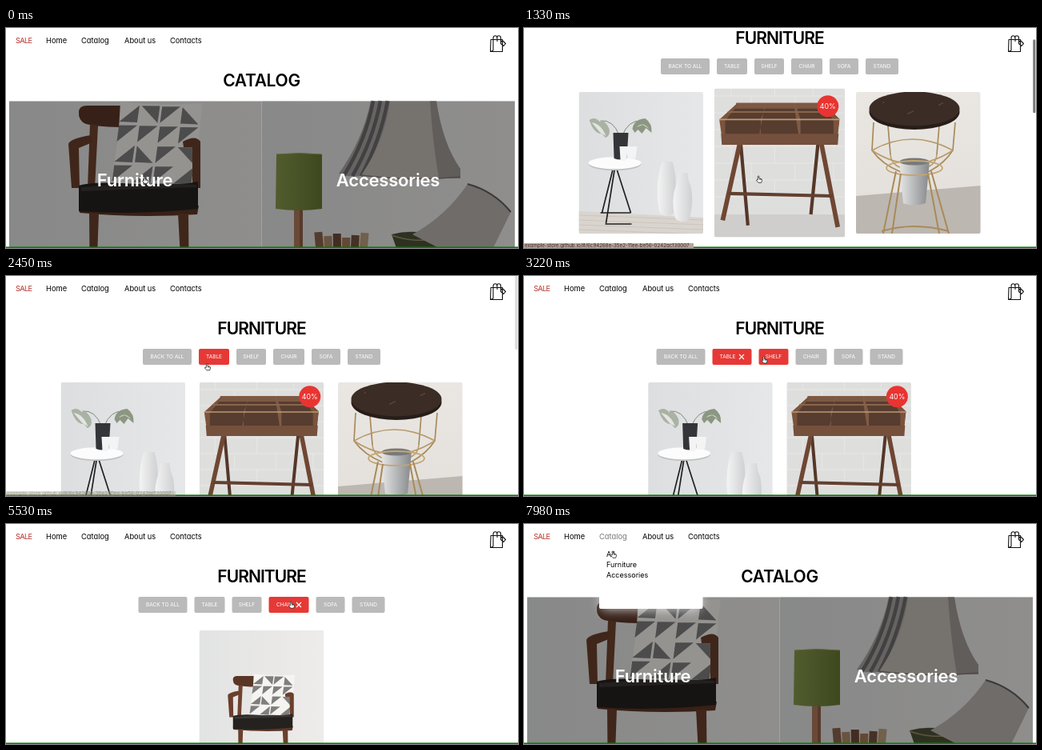
An HTML page for the animation above (8 s loop, 640 px wide and 275 px high).

```html
<!DOCTYPE html>
<html lang="en">
<head>
<meta charset="utf-8">
<title>Shop catalog</title>
<style>
  html, body { margin: 0; width: 100%; height: 100%; overflow: hidden; background: #fff; }
  svg { display: block; width: 640px; height: 275px; font-family: Inter, "Open Sans", sans-serif; font-feature-settings: "cv11"; }
  .title { font-size: 21px; font-weight: 600; text-anchor: middle; }
  .cover { font-size: 22px; font-weight: 600; letter-spacing: -.2px; text-anchor: middle; fill: #fff; }
  .nav { font-size: 9.3px; }
  .menu { font-size: 9px; }
  .button { font-size: 6.5px; fill: #fff; }
  .badge { font-size: 8.8px; fill: #fff; text-anchor: middle; }
  .status { font-size: 6.2px; fill: #3d2a20; }
</style>
</head>
<body>
<svg viewBox="0 0 640 275">
  <defs id="defs"></defs>
  <g id="stage"></g>
</svg>
<script>
const LOOP = 8000;
const CARD_W = 155.5, CARD_H = 177, CARD_PITCH = 173.25, CENTER = 319.5;

const shape = (fill, d) => `<path fill="${fill}" d="${d}"/>`;
const line = (color, width, d) => `<path fill="none" stroke="${color}" stroke-width="${width}" d="${d}"/>`;
const rect = (fill, x, y, w, h, extra = '') => `<rect x="${x}" y="${y}" width="${w}" height="${h}" fill="${fill}" ${extra}/>`;
const oval = (fill, x, y, rx, ry) => `<ellipse cx="${x}" cy="${y}" rx="${rx}" ry="${ry}" fill="${fill}"/>`;
const text = (cls, x, y, words, extra = '') => `<text class="${cls}" x="${x}" y="${y}" ${extra}>${words}</text>`;
const group = (attrs, content) => `<g ${attrs}>${content}</g>`;
const use = (id, transform = '') => `<use href="#${id}" transform="${transform}"/>`;
const gradient = (id, from, to, vertical) =>
  `<linearGradient id="${id}" ${vertical ? 'x2="0" y2="1"' : ''}><stop stop-color="${from}"/><stop offset="1" stop-color="${to}"/></linearGradient>`;

// Eased interpolation through [time, value] pairs.
function track(t, keys) {
  if (t <= keys[0][0]) return keys[0][1];
  for (let i = 1; i < keys.length; i++) {
    const [t1, v1] = keys[i], [t0, v0] = keys[i - 1];
    if (t < t1) {
      const k = (t - t0) / (t1 - t0);
      return v0 + (v1 - v0) * k * k * (3 - 2 * k);
    }
  }
  return keys.at(-1)[1];
}

function pillow() {
  const at = (u, v) => `${143 + u * 25.5 - v * 3} ${94 + u * .8 + v * 25}`;
  let out = shape('#f6f4f0', 'M143 92Q195 98 246 94Q239 145 238 196Q185 198 131 193Q141 145 143 92Z');
  for (let v = 0; v < 4; v++) for (let u = 0; u < 4; u++) {
    const corners = [at(u + .06, v + .1), at(u + .95, v + .08), at(u + .93, v + .93), at(u + .05, v + .92)];
    corners.splice((u * 3 + v * 2 + u * v) % 4, 1);
    out += shape('url(#hatch)', `M${corners.join('L')}Z`);
  }
  return out;
}

const chair = () =>
  rect('url(#wall)', 0, -20, 325, 365) +
  shape('#5a3626', 'M91 104Q92 97 101 97L150 97L150 124Q118 124 100 120Q90 116 91 104Z') +
  shape('#70432f', 'M105 120L115 122L111 200L102 200Z') +
  pillow() +
  shape('#6b3f2c', 'M78 145Q80 138 106 134L108 143L91 150L92 200L82 200Z') +
  shape('#6b3f2c', 'M221 142Q237 133 243 142L243 200L233 200L233 149L222 149Z') +
  shape('#5d3625', 'M91 222L241 222L239 233Q165 238 92 231Z') +
  shape('#24211f', 'M91 197Q108 191 165 195Q220 197 240 192L240 226Q165 234 91 229Z') +
  shape('#3a3634', 'M94 199Q165 192 238 196L238 199Q165 201 94 204Z') +
  shape('#6b3f2c', 'M104 231L116 232L112 340L105 340ZM215 232L228 232L229 340L221 340Z') +
  line('#5d3625', 5, 'M112 300L222 300');

function lamps() {
  let out = rect('url(#wall)', 320, 91, 316, 184) +
    shape('#aaa5a4', 'M456 91L482 91Q476 140 448 184Q432 188 416 182Q446 140 456 91Z');
  for (let i = 0; i < 3; i++) out += line('#706b6d', 4.5, `M${459 + i * 9} 91Q${450 + i * 9} 140 ${422 + i * 11} 185`);
  out += shape('#c4bdb7', 'M480 91L532 91Q540 145 568 184Q505 192 444 184Q474 140 480 91Z') +
    shape('#a19a96', 'M530 91L538 91Q546 145 568 176L568 188L541 188Q533 140 530 91Z') +
    line('#857d78', 1.5, 'M444 184Q505 192 568 186') +
    rect('#ae7a5b', 360, 225, 11, 50) + rect('#8f5f46', 367, 225, 4, 50) +
    shape('url(#green)', 'M338 158Q366 155 395 158L395 226Q366 230 337 226Z') +
    line('#9ba15d', 1, 'M338 158Q366 155 395 158');
  ['#8a644c', '#b08a69', '#6e4a39', '#a67857', '#75513f', '#bca07c'].forEach((fill, i) =>
    out += rect(fill, 387 + i * 11, 255 + (i * 5) % 8, 10, 22, `transform="rotate(${-5 + i * 2} ${392 + i * 11} 274)"`));
  return out +
    shape('#4d5137', 'M482 258Q512 250 546 262L538 275L488 275Z') +
    line('#989269', 1.5, 'M482 259Q512 270 546 262') +
    shape('#bbb4b1', 'M577 195Q610 204 631 230L609 275L541 275L508 258Q550 235 577 195Z') +
    line('#625d60', 2, 'M577 195Q610 204 631 230');
}

function sideTable() {
  let out = rect('url(#cool)', 0, 0, 156, 177) + shape('#d9d4ce', 'M0 149L156 157V177H0Z');
  for (let i = 0; i < 4; i++) out += line('#c3bbb3', .6, `M0 ${154 + i * 6}L156 ${160 + i * 6}`);
  return out +
    line('#7c8a74', 1, 'M51 55Q43 34 27 36M54 55Q62 35 78 36') +
    shape('#a9b2a3', 'M13 35Q20 30 26 37Q33 34 38 46Q40 55 33 57Q29 51 26 52Q18 50 13 35Z') +
    shape('#e3e5e2', 'M16 38Q28 40 34 55L27 51Z') +
    shape('#8c9782', 'M67 46Q69 34 83 33Q92 39 91 51L84 45L79 52L74 47L70 51Z') +
    shape('#d5dbd0', 'M72 44Q80 36 88 46L80 41Z') +
    line('#222', 1.7, 'M43 95L29 151M45 95L34 164M47 95L65 151M27 151H65M33 165H66') +
    oval('#bfc0c1', 45, 90, 33, 8) + oval('#fcfcfc', 45, 88.7, 33, 7.5) +
    shape('#333538', 'M43 51H62L60 83Q52 86 44 83Z') +
    shape('#f4f4f4', 'M51 68H61L60 85Q55 87 52 85ZM60 68H73L71 83Q66 85 61 83Z') +
    shape('url(#pot)', 'M104 87H117Q124 110 120 148Q118 155 110 155Q102 155 100 148Q95 112 104 87Z') +
    shape('url(#pot)', 'M124 101H136Q136 109 140 118Q144 135 139 156Q137 162 130 162Q122 162 120 156Q115 135 121 118Q124 109 124 101Z');
}

function desk() {
  let out = rect('#dededd', 0, 0, 156, 177) + rect('#cfcecc', 0, 150, 156, 27);
  for (let i = 0; i < 7; i++) out += line('#ebebea', .7, `M0 ${i * 20 + 9}H156M${20 + i % 2 * 24} ${i * 20 - 11}v20m52 -20v20m46 -20v20`);
  out += line('#553728', 4, 'M31 60L40 163M124 60L115 150') +
    line('#6f4733', 5.5, 'M32 58L10 157M126 58L147 165') +
    line('#62402f', 4, 'M17 125L141 128') +
    shape('#573d2f', 'M27 18H130L149 37L146 58H10L7 37Z') +
    shape('#7b5a45', 'M27 18H130L134 24H22Z');
  for (let i = 1; i < 3; i++)
    out += shape('#805c47', `M${26 + i * 34.3} 18h2L${8 + i * 47.3} 37V57h-2Z`);
  return out +
    shape('#7b533d', 'M27 18L29 19L13 38V58H9L6 37ZM130 18L149 36L147 58H142V39Z') +
    line('#8a644c', 2, 'M16 28H140') +
    line('#bd9a75', 1.6, 'M6 37H149') +
    line('#83583f', 2, 'M26 18H131') +
    shape('#75503c', 'M8 54H148L147 67H9Z');
}

const stool = () =>
  rect('url(#warm)', 0, 0, 156, 177) + shape('#bcb7b1', 'M0 130L156 117V177H0Z') +
  line('#a88a5b', 1.7, 'M22 38L20 73Q32 90 56 100M124 38L121 73Q110 90 90 100M40 42L43 78M104 42L101 78') +
  line('#b99b6a', 1.6, 'M20 73Q70 45 121 73M20 73Q70 106 121 73M43 78Q44 96 72 98Q100 96 101 78') +
  shape('url(#steel)', 'M54 86H92L87 139Q72 144 59 139Z') + oval('#77797b', 73, 87, 18.5, 4.5) +
  line('#c3a573', 1.8, 'M38 95a35 9 0 1 0 70 0a35 9 0 1 0 -70 0') +
  line('#a98a59', 2, 'M50 99L34 177M94 99L116 177M56 102L45 177M90 102L104 177M32 174Q72 162 116 174') +
  oval('#271d19', 73, 25, 56.5, 22) + oval('#3b2c25', 73, 21, 56.5, 21.5) +
  [0, 1, 2, 3, 4, 5, 6, 7].map(i => oval('#8a6c55', 34 + (i * 37) % 76, 13 + (i * 11) % 21, .8, .5)).join('');

const shelf = () =>
  rect('#e1e1e1', 0, 0, 156, 177) +
  line('#a78d68', 2, 'M31 24V177M78 23V177M121 24V177') + line('#dec9a6', 3, 'M27 20V177M74 20V177M118 20V177') +
  [41, 85, 130].map(y => rect('#d7bf99', 9, y - 2, 130, 2) + rect('#92795a', 8, y, 132, 2.2)).join('') +
  shape('#c93a3a', 'M29 43L34 42L38 83H31Z') + shape('#ece5dc', 'M34 43L37 43L43 83H38Z') + shape('#a88769', 'M39 53L42 53L46 83H43Z') +
  rect('#3f5358', 79, 76, 36, 3) + rect('#f2f2ee', 78, 79, 37, 5) +
  `<text x="80" y="80.5" font-size="6.5" font-weight="600" fill="#294550">MINERAL</text>` +
  rect('#f2eee6', 28, 125, 27, 2) + rect('#c1a37c', 30, 127, 25, 2) +
  shape('url(#steel)', 'M95 93H101L102 108L107 128Q98 131 88 128L94 108Z') +
  line('#55504a', .8, 'M95 93H101L102 108L107 128Q98 131 88 128L94 108Z');

const product = (id, content) => group(`id="${id}" clip-path="url(#card)"`, content);

document.getElementById('defs').innerHTML =
  gradient('wall', '#e2e3e3', '#eeecea') + gradient('cool', '#dcdee0', '#e6e7e8') +
  gradient('warm', '#eae7e3', '#e2dfda', true) + gradient('green', '#87994b', '#667834') +
  gradient('steel', '#e6e6e6', '#85888b') + gradient('pot', '#f4f4f4', '#cfd0d2') +
  `<pattern id="hatch" width="2" height="2" patternUnits="userSpaceOnUse" patternTransform="rotate(25)">
    ${rect('#8f8e8e', 0, 0, 2, 2) + rect('#6f6e6f', 0, 0, 1, 2)}</pattern>
  <clipPath id="card"><rect width="${CARD_W}" height="${CARD_H}" rx="2"/></clipPath>
  <clipPath id="cover"><path d="M4 91.5H319V275H4Z"/></clipPath>
  <filter id="glow" x="-30%" y="-50%" width="160%" height="200%"><feGaussianBlur stdDeviation="7"/></filter>` +
  product('chairCard', group('transform="scale(.5) translate(-7 17)"', chair())) +
  product('sideTable', sideTable()) + product('desk', desk()) +
  product('stool', stool()) + product('shelf', shelf()) +
  group('id="bag" fill="none" stroke="#111" stroke-width="1.1" stroke-linejoin="round"',
    '<path d="M606 14.5H620.5V29.5H605.5Z M609 14.5V28L606 29.5 M609 17V12.5a2.5 2.8 0 0 1 5 0V17 M613.5 12.5a2.5 2.8 0 0 1 5 0V17 M618.5 17L621 16L624.5 19.5L622 22.5L618.5 19.5Z"/>') +
  group('id="hand" fill="#fff" stroke="#222" stroke-width=".8" stroke-linejoin="round"',
    '<path d="M-1.7 1V-3.3a.8 .8 0 0 1 1.6 0V-1L2.6 -.4Q3.7 0 3.5 1.5L2.7 4.3H-1L-3.6 1.4Q-3.4 0 -1.7 1ZM.8 -.6V1M2.2 -.3V1"/>') +
  '<path id="arrow" d="M-1.5 -4.5V3L.2 1.5L1.5 4.2L2.7 3.6L1.5 1.1H3.6Z" fill="#111" stroke="#fff" stroke-width=".5"/>' +
  group('id="catalog"',
    text('title', CENTER, 73, 'CATALOG', 'letter-spacing="-.3"') +
    group('clip-path="url(#cover)"', chair()) + lamps() +
    rect('#000', 4, 91.5, 632, 184, 'opacity=".4"') + rect('#a3a2a0', 319, 91.5, 1, 184) +
    text('cover', 161, 197.5, 'Furniture') + text('cover', 477.5, 197.5, 'Accessories'));

const BADGES = { desk: '40%', shelf: '20%' };
const BUTTONS = [['BACK TO ALL', 61], ['TABLE', 38], ['SHELF', 37], ['CHAIR', 39], ['SOFA', 36], ['STAND', 41]];
const FILTERS = [
  { until: 2520, selected: '', items: ['sideTable', 'desk', 'stool'] },
  { until: 3430, selected: 'TABLE', items: ['sideTable', 'desk'] },
  { until: 5100, selected: 'SHELF', items: ['shelf'] },
  { until: 6150, selected: 'CHAIR', items: ['chairCard'] }
];
const POINTER = [
  [0, 174, 190], [700, 174, 190], [1200, 294, 189], [1500, 294, 189], [2200, 252, 113.5], [2800, 252, 113.5],
  [3300, 304, 104], [4550, 304, 104], [5000, 357, 101], [5600, 357, 101], [6050, 196, 101], [6370, 196, 101],
  [6900, 117, 45], [7210, 117, 45], [7400, 113, 18], [7600, 113, 18], [7850, 112, 38]
];

const nav = hovered =>
  text('nav', 12, 18.7, 'SALE', 'fill="#b8322b" letter-spacing="-.7"') +
  [['Home', 50], ['Catalog', 94], ['About us', 148], ['Contacts', 205]].map(([label, x]) =>
    text('nav', x, 18.7, label, label === 'Catalog' && hovered ? 'fill="#777"' : '')).join('');

function filterBar(selected, x, y) {
  let left = CENTER - (297 + (selected ? 11 : 0)) / 2;
  return BUTTONS.map(([label, base]) => {
    const active = label === selected, width = base + (active ? 11 : 0);
    const hovered = x > left && x < left + width && Math.abs(y - 101) < 13;
    const cross = left + width - 12.5;
    const out = rect(active || hovered ? '#e63936' : '#bababa', left, 91, width, 20, 'rx="2"') +
      text('button', left + base / 2, 103.4, label, 'text-anchor="middle"') +
      (active ? line('#fff', 1.1, `M${cross - 3} 98l6 6m0 -6l-6 6`) : '');
    left += width + 9;
    return out;
  }).join('');
}

function cards(items, t) {
  const hover = {
    sideTable: track(t, [[640, 0], [800, 1], [880, 1], [1050, 0]]),
    desk: track(t, [[1030, 0], [1250, 1], [1850, 1], [2050, 0]])
  };
  return items.map((id, i) => {
    const x = CENTER + (i - (items.length - 1) / 2) * CARD_PITCH - CARD_W / 2;
    const grow = t < 2520 ? (hover[id] || 0) * .05 : 0;
    const image = use(id, `translate(${x - grow * CARD_W / 2} ${133 - grow * CARD_H / 2}) scale(${1 + grow})`);
    const badge = BADGES[id] ? oval('#e93431', x + 138, 150.7, 13.5, 13.5) + text('badge', x + 138, 153.9, BADGES[id]) : '';
    return image + badge;
  }).join('');
}

function dropdown(opacity) {
  if (!opacity) return '';
  return group(`opacity="${opacity}"`,
    rect('#fff', 97, 40, 123, 67, 'filter="url(#glow)" opacity=".75"') +
    rect('#fff', 94, 27, 129.5, 79, 'rx="2"') +
    ['All', 'Furniture', 'Accessories'].map((label, i) => text('menu', 103, 41.2 + i * 13.1, label)).join(''));
}

function statusBar(t) {
  const early = t < 4000;
  const opacity = early
    ? track(t, [[640, 0], [740, 1], [2310, 1], [2570, 0]])
    : track(t, [[6380, 0], [6480, 1], [7210, 1], [7450, 0]]);
  const words = early
    ? 'example-store.github.io/#/6c94268e-35e2-11ee-be56-0242ac130007'
    : 'https://example-store.github.io/shop/furniture';
  return group(`opacity="${opacity}"`,
    rect(early ? '#b9a59c' : '#d2ae9c', 0, 269, early ? 212 : 160, 6) + text('status', 1, 274, words));
}

function scene(t) {
  const x = track(t, POINTER.map(p => [p[0], p[1]]));
  const y = track(t, POINTER.map(p => [p[0], p[2]]));
  const scroll = track(t, [[800, 0], [1270, 53], [1500, 53], [2080, 0]]);
  const menu = track(t, [[7330, 0], [7550, 1]]);
  const thumb = track(t, [[780, 0], [880, 1], [2200, 1], [2420, .3], [2590, 0]]);
  const filter = t >= 630 && FILTERS.find(f => t < f.until);
  const page = filter
    ? text('title', CENTER, 73, 'FURNITURE', 'letter-spacing="-.95"') +
      filterBar(filter.selected, x, y + scroll) + cards(filter.items, t)
    : use('catalog');
  return rect('#fff', 0, 0, 640, 275) +
    group(`transform="translate(0 ${-scroll})"`, page + dropdown(menu) + nav(t > 7330)) +
    use('bag') +
    rect('#777', 636.3, scroll * .27, 3, 92, `rx="1.5" opacity="${thumb}"`) +
    rect('#0a7d0a', 0, 273.4, 640, 1.6) +
    statusBar(t) +
    use(t > 6750 && t < 7330 ? 'arrow' : 'hand', `translate(${x} ${y})`);
}

const stage = document.getElementById('stage');
const start = performance.now();
function draw() {
  stage.innerHTML = scene((performance.now() - start) % LOOP);
  requestAnimationFrame(draw);
}
draw();
</script>
</body>
</html>
```
